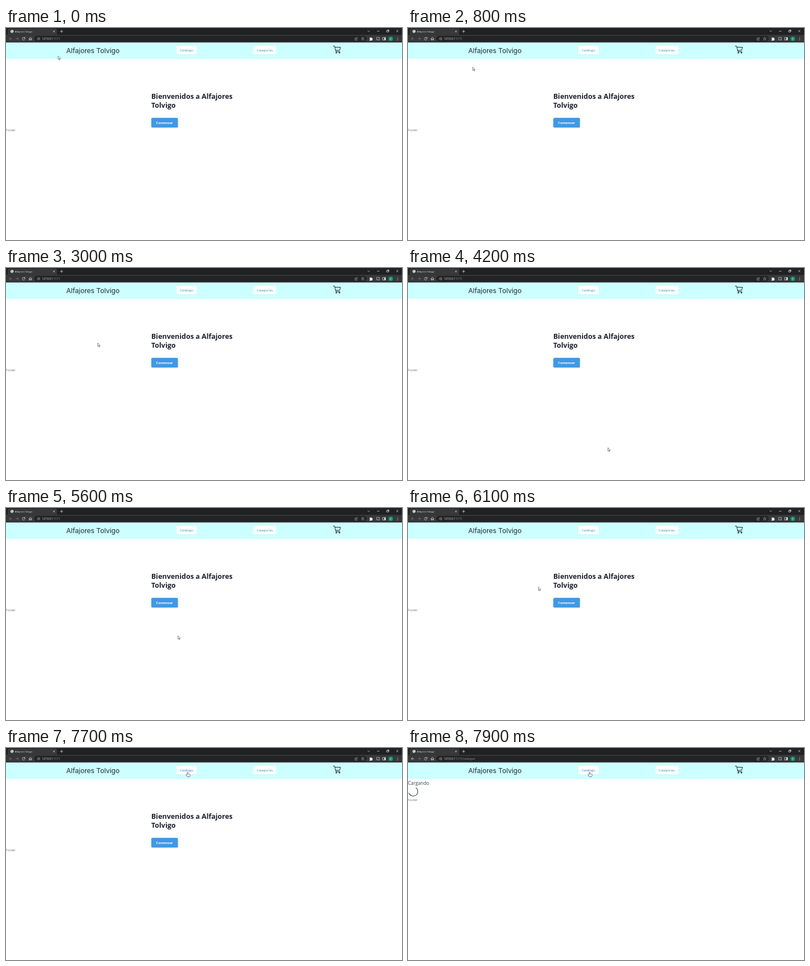
Animation of 706x380 px, one loop 8 s. Source, as an HTML page:

```html
<!DOCTYPE html>
<html lang="es">
<head>
<meta charset="utf-8">
<title>Alfajores Tolvigo</title>
<style>
  html, body { margin: 0; width: 100%; height: 100%; overflow: hidden; background: #fff; }
  svg { display: block; width: 100%; height: 100%; }
  text { font-family: "Open Sans", "Noto Sans", sans-serif; }
  .logo { font-family: Inter, Roboto, sans-serif; font-size: 12.07px; fill: #1d2b3a; }
  .nav { font-size: 5.87px; fill: #3a8fb5; }
  .nav.hover { fill: #3b72cf; }
  .head { font-size: 12.45px; font-weight: 700; fill: #1a202c; }
  .foot { font-size: 5.6px; fill: #666b73; }
  .line { fill: none; stroke-linecap: round; stroke-linejoin: round; }
</style>
</head>
<body>
<svg viewBox="0 0 706 380" xmlns="http://www.w3.org/2000/svg">
  <rect width="706" height="380" fill="#fff"/>

  <!-- browser window -->
  <rect width="706" height="13" fill="#202122"/>
  <rect y="12.3" width="706" height="13.7" fill="#37383a"/>
  <path d="M0 12.6Q3 12.6 3 10V4Q3 1 6 1H88Q91 1 91 4V10Q91 12.6 94 12.6Z" fill="#37383a"/>
  <circle cx="10.8" cy="6.1" r="2.7" fill="#e4e6e8"/>
  <path class="line" d="M9.2 5Q10.8 5.3 10.6 6.6T12.3 7.2" stroke="#55585b" stroke-width=".7"/>
  <text x="16" y="7.7" font-size="4.1" fill="#e3e4e6">Alfajores Tolvigo</text>
  <g class="line" stroke="#dcdddf" stroke-width=".75">
    <path d="M84.2 4.8l2.6 2.6m0-2.6l-2.6 2.6M96.9 6.1h4.4m-2.2-2.2v4.4"/>
    <path d="M645 4.8l1.7 1.7 1.7-1.7M661.8 5.6h3.6M696 3.8l3.2 3.2m0-3.2l-3.2 3.2"/>
    <path d="M679 4.5h2.8v2.7H679zM680 4.3v-.9h2.8v2.8h-.8"/>
  </g>
  <rect x="50.5" y="14.2" width="592.5" height="10" rx="5" fill="#222325"/>
  <g class="line" stroke="#d5d7d9" stroke-width=".8">
    <path id="back" d="M10.6 19.2H6m2.1-2.2L5.9 19.2l2.2 2.2"/>
    <path d="M17.6 19.2h4.6m-2.1-2.2l2.2 2.2-2.2 2.2" stroke="#77797c"/>
    <path d="M33.6 18A2.4 2.4 0 1 0 33.8 20M33.9 16.6v1.7h-1.7"/>
    <path d="M40.8 19.2l2.7-2.5 2.7 2.5M41.6 18.8v2.7h1.3v-1.6h1.2v1.6h1.3v-2.7"/>
    <g stroke="#b6b8ba" stroke-width=".6">
      <circle cx="58" cy="19.2" r="2.2"/>
      <path d="M58 19.1v1.2M58 18v.1"/>
      <path d="M623.6 18h-1.4v3.8h4.2v-1.1M623.5 20.1q.3-2.1 2.5-2.1m-1-1.2l1.6 1.2-1.6 1.2"/>
      <path d="M636.1 16.6l.8 1.7 1.9.2-1.4 1.3.4 1.9-1.7-1-1.7 1 .4-1.9-1.4-1.3 1.9-.2z"/>
    </g>
    <path d="M660.6 18v-1.1h5v4.6h-2.1M660.6 19.3q2 .2 2.1 2.2M660.6 20.9v.5" stroke-width=".7"/>
    <path d="M672 17h4.6v4.5H672z"/>
  </g>
  <path d="M648 17.7h1.5a1 1 0 1 1 2 0h1.4v1.4a1 1 0 1 1 0 2v1.3H648v-1.5a.9.9 0 1 0 0-1.8zM674.5 17h2.2v4.5h-2.2z" fill="#eceded"/>
  <circle cx="686" cy="19.2" r="4" fill="#0c9b72"/>
  <text x="686" y="20.8" font-size="4.3" text-anchor="middle" fill="#fff">E</text>
  <g fill="#dcdddf">
    <circle cx="698.2" cy="17.3" r=".55"/><circle cx="698.2" cy="19.2" r=".55"/><circle cx="698.2" cy="21.1" r=".55"/>
  </g>
  <text x="64" y="20.9" font-size="4.74" fill="#f0f1f2">127.0.0.1<tspan fill="#8e9194">:5173</tspan><tspan id="path" fill="#8e9194"></tspan></text>

  <!-- site header -->
  <rect y="26" width="706" height="29.5" fill="#ccffff"/>
  <text class="logo" x="107.5" y="45.2">Alfajores Tolvigo</text>
  <rect x="304" y="32" width="36" height="15" rx="2.4" fill="#fff"/>
  <rect x="441.5" y="32" width="40.5" height="15" rx="2.4" fill="#fff"/>
  <text class="nav" id="catalog" x="309.8" y="41.7">Catálogo</text>
  <text class="nav" x="447" y="41.7">Categorías</text>
  <g class="line" stroke="#17262b" stroke-width="1">
    <path d="M583.5 32.4h2.2l2.7 9.9h6.9M586.3 34.5h10l-1.4 5.3-7.1.5"/>
    <circle cx="588.8" cy="44.3" r="1"/><circle cx="594.4" cy="44.3" r="1"/>
  </g>

  <!-- pages -->
  <g id="home">
    <text class="head" x="259" y="127.4">Bienvenidos a Alfajores</text>
    <text class="head" x="259" y="143.4">Tolvigo</text>
    <rect x="259" y="161" width="47.6" height="17.6" rx="2.2" fill="#4099e6"/>
    <text x="267.6" y="172.2" font-size="6" font-weight="700" fill="#fff">Comenzar</text>
    <text class="foot" x="0" y="185">Footer</text>
  </g>
  <g id="loading">
    <text x="0" y="66" font-size="8.4" fill="#38424f">Cargando</text>
    <path id="spinner" class="line" stroke="#3c4654" stroke-width="1.1"/>
    <text class="foot" x="0" y="95.3">Footer</text>
  </g>

  <!-- pointers, tip at 0,0 -->
  <path id="arrow" d="M0 0V6L1.4 4.8 2.4 7 3.4 6.5 2.5 4.4H4.3Z" fill="#fff" stroke="#30343a" stroke-width=".6" stroke-linejoin="round"/>
  <path id="hand" d="M-.8 5.2V.7Q0-.5.8.7V3.2Q1.5 2.6 2.2 3.4 2.9 2.9 3.5 3.7 4.4 3.4 4.6 4.3V6Q4.4 7 3.8 8.3H-.4L-2.6 5.3Q-2.4 4.2-.8 5.2Z" fill="#fff" stroke="#30343a" stroke-width=".65" stroke-linejoin="round"/>
</svg>
<script>
const LOOP = 8000, STEP = 100;
const HOVER_AT = 7100, LOAD_AT = 7800;
// start time, number of steps, x and y reached
const moves = [
  [500, 1, 105, 58], [800, 3, 136, 94], [1600, 2, 140, 102],
  [2900, 2, 163.7, 134.6], [4200, 1, 356.5, 322], [5100, 1, 481, 350.5],
  [5600, 1, 306.6, 229], [6000, 3, 195.5, 98], [6600, 1, 407, 58.5],
  [7100, 1, 332.7, 45.4], [7200, 3, 323.6, 43.2]
];
const el = id => document.getElementById(id);
const show = (id, on) => el(id).setAttribute("display", on ? "inline" : "none");

function pointerAt(t) {
  let x = 93, y = 50.3;
  for (const [start, steps, nx, ny] of moves) {
    if (t < start) break;
    const k = Math.min(1, ((t - start) / STEP + 1) / steps);
    x += (nx - x) * k;
    y += (ny - y) * k;
  }
  return `translate(${x} ${y})`;
}

function arc(cx, cy, r, from, to) {
  const point = deg => {
    const a = deg * Math.PI / 180;
    return `${cx + r * Math.cos(a)} ${cy + r * Math.sin(a)}`;
  };
  return `M${point(from)}A${r} ${r} 0 ${to - from > 180 ? 1 : 0} 1 ${point(to)}`;
}

function draw(time) {
  const t = Math.floor(time % LOOP / STEP) * STEP;
  const hover = t >= HOVER_AT, loading = t >= LOAD_AT;
  show("home", !loading);
  show("loading", loading);
  show("arrow", !hover);
  show("hand", hover);
  el(hover ? "hand" : "arrow").setAttribute("transform", pointerAt(t));
  el("catalog").classList.toggle("hover", t > HOVER_AT);
  el("path").textContent = loading ? "/catalogue" : "";
  el("back").setAttribute("stroke", loading ? "#d5d7d9" : "#77797c");
  const turn = (t - LOAD_AT - STEP) / 450 * 360;
  el("spinner").setAttribute("d", arc(9.3, 78, 8.2, turn - 52, turn + 160));
}

const begin = performance.now();
function tick() {
  draw(performance.now() - begin);
  requestAnimationFrame(tick);
}
tick();
</script>
</body>
</html>
```
